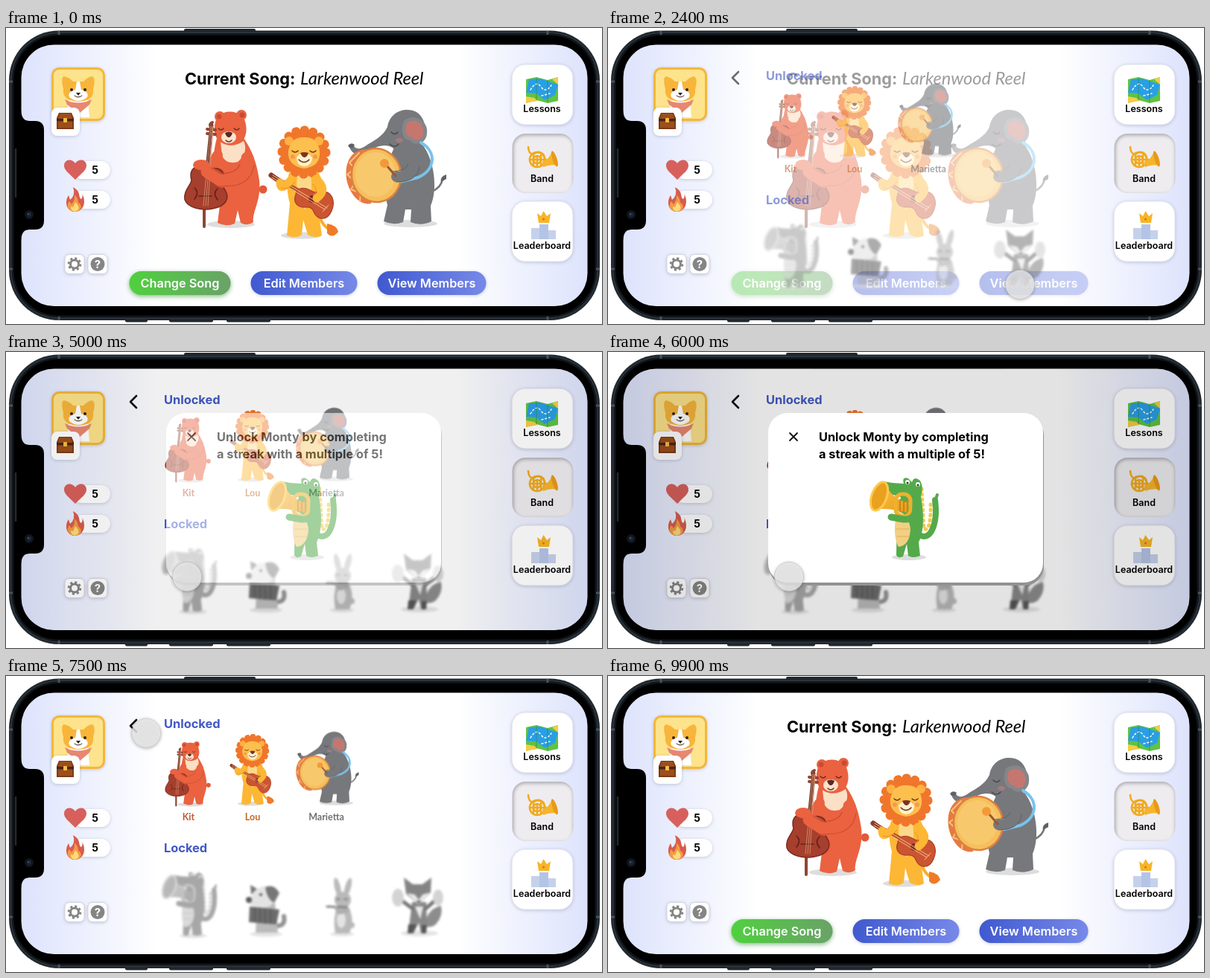
An HTML page for the animation above (10000 ms loop, 800x398 px).

```html
<!DOCTYPE html>
<html lang="en">
<head>
<meta charset="utf-8">
<title>Animal band</title>
<style>
  html, body { margin: 0; width: 100%; height: 100%; overflow: hidden; background: #fff; }
  svg { display: block; width: 800px; height: 398px; }
  text { font-family: Inter, sans-serif; font-weight: 700; }
  .mid { text-anchor: middle; }
  .tab { font-size: 12.5px; font-weight: 600; text-anchor: middle; }
  .pill { font-size: 16.3px; font-weight: 600; fill: #fff; text-anchor: middle; }
  .head { font-size: 16.4px; fill: #4059c6; }
  .name { font: 700 12.5px Lato, sans-serif; text-anchor: middle; }
  .line { fill: none; stroke-linecap: round; stroke-linejoin: round; }
  .soft { filter: drop-shadow(0 1px 2px #7f86a866); }
  .glow { filter: drop-shadow(0 2px 3px #4c9a48aa); }
  .inset { fill: none; filter: blur(2px); }
  .locked { filter: grayscale(1) blur(1.4px); opacity: .8; }
  #list, #popup { opacity: 0; }
  #finger { transform: translate(552px, 420px); }
  #touch { filter: drop-shadow(0 1px 2px #0005); }
</style>
</head>
<body>
<svg viewBox="0 0 800 398">
<defs>
  <linearGradient id="sky"><stop stop-color="#dde3fc"/><stop offset=".24" stop-color="#fff"/><stop offset=".77" stop-color="#fff"/><stop offset="1" stop-color="#dde3fc"/></linearGradient>
  <linearGradient id="green"><stop stop-color="#50d03f"/><stop offset="1" stop-color="#6aa268"/></linearGradient>
  <linearGradient id="blue"><stop stop-color="#4059cf"/><stop offset="1" stop-color="#7789e8"/></linearGradient>
  <linearGradient id="gold" x2="1" y2="1"><stop stop-color="#ffc64a"/><stop offset="1" stop-color="#e79a18"/></linearGradient>
  <clipPath id="glass"><rect x="20.5" y="22.5" width="760" height="351.5" rx="44"/></clipPath>
  <clipPath id="pressed"><rect x="679.5" y="142" width="82" height="80" rx="18"/></clipPath>

  <g id="bear">
    <ellipse cx="302" cy="264" rx="32" ry="5" fill="#ddd"/>
    <circle cx="345" cy="217" r="5.5" fill="#e05a38"/>
    <path fill="#ea623f" d="M283 148C276 172 276 215 287 238L284 262Q295 268 307 263L311 245 315 262Q325 267 332 261C330 247 343 232 340 205C337 183 331 165 319 148Z"/>
    <path fill="#fbe0c6" d="M288 153Q302 163 319 152Q326 167 311 180Q296 184 290 172Z"/>
    <g fill="#ea623f"><circle cx="287" cy="119" r="7"/><circle cx="316" cy="117" r="7"/><path d="M284 118Q300 107 318 118C325 132 325 151 310 156Q296 160 286 152C277 144 279 128 284 118Z"/></g>
    <g fill="#c94b34"><circle cx="286" cy="119" r="3.5"/><circle cx="317" cy="117" r="3.5"/></g>
    <ellipse cx="299" cy="147" rx="10" ry="8" fill="#fce3cd"/>
    <path fill="#5b2a22" d="M294 141Q299 138 304 141Q302 147 299 147Q296 147 294 141Z"/>
    <path class="line" stroke="#6e2d22" stroke-width="1.5" d="M285 135q4 4 7 0M306 135q4 4 7 0M295 151q4 4 8 0"/>
    <path class="line" stroke="#ea623f" stroke-width="14" d="M284 171Q277 186 262 187"/>
    <path class="line" stroke="#74382c" stroke-width="5" d="M276 131 270 190"/>
    <path class="line" stroke="#8f4631" stroke-width="4" d="M277 127q-6 3 0 8M270 136l11 1M270 142l11 1M266 245V267"/>
    <path fill="#a63f2d" stroke="#7c2c22" stroke-width="1.5" d="M262 186C250 185 246 194 249 205C247 213 238 219 240 231C244 242 264 246 277 243C295 240 301 229 294 218C289 211 288 205 292 197C291 188 278 187 272 190Z"/>
    <path class="line" stroke="#662118" stroke-width="1.6" d="M253 215q7 6 0 15M284 216q-7 6 0 15M259 226H276"/>
    <path class="line" stroke="#d99a76" stroke-width=".8" d="M275 132 265 239M277 132 268 239M278 132 271 239"/>
    <path class="line" stroke="#ea623f" stroke-width="17" d="M324 175Q328 194 310 203L290 206 270 193"/>
    <path class="line" stroke="#c94a31" stroke-width="1.1" d="M314 183Q310 195 288 196L275 188M333 184Q329 209 304 212L284 213M254 184l8 5M255 188l7 4"/>
    <ellipse cx="262" cy="184" rx="11" ry="7" fill="#ea623f"/>
  </g>

  <g id="lion">
    <ellipse cx="396" cy="279" rx="27" ry="4.5" fill="#ddd"/>
    <path class="line" stroke="#f7ae2d" stroke-width="4" d="M418 247Q427 273 439 270"/>
    <path fill="#ef7b26" d="M431 263Q444 265 446 274Q438 284 431 276Z"/>
    <path fill="#fdb735" d="M383 187Q373 208 381 236L377 279Q389 284 397 278L399 258 405 278Q415 284 424 279L420 250C430 231 428 203 415 188Z"/>
    <path fill="#fdd88a" d="M391 198Q400 204 409 198Q413 225 401 244Q387 229 391 198Z"/>
    <circle cx="400" cy="167" r="31" fill="#f0762b"/>
    <circle cx="400" cy="167" r="30" fill="none" stroke="#f0762b" stroke-width="11" stroke-linecap="round" stroke-dasharray="1 10.78"/>
    <g transform="translate(0 5)">
      <circle cx="380" cy="147" r="6" fill="#fcb343"/><circle cx="420" cy="147" r="6" fill="#fcb343"/>
      <path fill="#fdbf4d" d="M379 160Q383 141 400 142Q418 141 421 160Q423 181 400 184Q377 180 379 160Z"/>
      <path fill="#fff0cf" d="M390 169Q400 156 411 169Q411 180 400 181Q390 180 390 169Z"/>
      <path fill="#79351f" d="M395 163Q400 161 406 163Q404 169 400 169Q397 168 395 163Z"/>
      <path class="line" stroke="#713718" stroke-width="1.5" d="M384 160q4 4 8 0M408 160q4 4 8 0M393 172q7 7 14 0"/>
      <g fill="#f28a50" opacity=".7"><circle cx="385" cy="168" r="3"/><circle cx="415" cy="168" r="3"/></g>
    </g>
    <path class="line" stroke="#b75326" stroke-width="5" d="M359 200 414 230"/>
    <path class="line" stroke="#8d3924" stroke-width="7" d="M356 198l7 5"/>
    <path fill="#cb5431" stroke="#a63f28" stroke-width="1.2" d="M389 224C389 215 400 213 408 218Q415 223 423 220C437 218 443 232 437 246C431 260 418 259 413 247Q411 240 402 241C390 242 385 233 389 224Z"/>
    <circle cx="411" cy="230" r="5" fill="#76281f"/>
    <path class="line" stroke="#f5c08b" stroke-width="1" d="M358 198 431 242M357 201 428 244M425 247l8-9"/>
    <path class="line" stroke="#fdb735" stroke-width="11" d="M383 204Q368 221 368 208M416 203Q433 217 417 229"/>
    <path class="line" stroke="#e89025" d="M388 207Q378 219 369 215M412 210Q421 219 412 225"/>
  </g>

  <g id="elephant">
    <ellipse cx="543" cy="263" rx="36" ry="5" fill="#ddd"/>
    <path class="line" stroke="#747579" stroke-width="2.5" d="M571 220Q584 215 586 203"/>
    <path fill="#606166" d="M584 207Q582 200 591 197L591 203Z"/>
    <path fill="#77787c" d="M523 158C508 181 508 222 512 238L507 260Q520 266 533 261L536 244 544 244 543 261Q557 267 571 260L570 239C580 217 575 177 559 157Z"/>
    <path fill="#77787c" d="M512 133C515 114 532 107 546 111C565 116 568 147 555 159C541 171 527 172 519 161C509 154 494 160 486 167C477 173 464 171 461 160L466 157C469 164 476 163 482 159C494 151 506 146 512 133Z"/>
    <path fill="#606166" d="M459 158q4-5 9-1l-2 4h-5z"/>
    <path fill="#85868a" d="M535 124C548 114 568 125 565 142C564 156 548 160 542 151C531 151 529 132 535 124Z"/>
    <path fill="#c5776f" d="M539 127C550 120 563 130 560 143C558 152 548 153 545 147C536 147 534 134 539 127Z"/>
    <path class="line" stroke="#47484d" stroke-width="1.5" d="M517 140q5 5 9 0M515 156q7 6 12 0"/>
    <ellipse cx="528" cy="151" rx="5" ry="3" fill="#b47d7c" opacity=".7"/>
    <path class="line" stroke="#78c3ec" stroke-width="4" d="M557 154C579 167 576 191 553 201L524 208"/>
    <path fill="#e77a40" d="M485 163C463 163 454 181 457 203C461 224 475 239 490 236L506 166Z"/>
    <path class="line" stroke="#f7c17a" stroke-width="2" d="M474 168 461 181 468 189 458 197 469 207 463 217 476 222 475 233"/>
    <ellipse cx="497" cy="198" rx="33" ry="36" transform="rotate(-8 497 198)" fill="#f5bf5b" stroke="#dd8143" stroke-width="2.5"/>
    <ellipse cx="496" cy="197" rx="27" ry="30" fill="#f9cc76" opacity=".7"/>
    <path class="line" stroke="#77787c" stroke-width="14" d="M547 183Q547 201 524 200"/>
    <path class="line" stroke="#606166" d="M540 183Q537 192 519 193M555 186Q553 207 524 207"/>
    <path class="line" stroke="#9a5835" stroke-width="3" d="M523 199 511 185"/><circle cx="508" cy="182" r="6" fill="#f39937"/>
  </g>

  <g id="croc">
    <ellipse cx="404" cy="276" rx="23" ry="4" fill="#ddd"/>
    <path class="line" stroke="#f2cb52" stroke-width="5" stroke-dasharray="1 6" d="M421 184 424 238Q434 242 433 202"/>
    <path class="line" stroke="#54aa4b" stroke-width="8" d="M414 243C433 260 443 230 439 199"/>
    <path class="line" stroke="#54aa4b" stroke-width="4" d="M439 200 442 192"/>
    <path fill="#54aa4b" d="M397 177Q394 167 403 170L408 175Q411 166 419 173Q424 181 420 194C423 214 426 237 417 256L419 274Q409 278 403 274L401 258 396 275Q389 278 387 273L388 220 393 195 379 191Q367 187 370 174Q383 177 397 177Z"/>
    <path fill="#f3cf83" d="M388 213Q403 217 406 238Q405 260 390 262Q381 247 388 213Z"/>
    <path class="line" stroke="#d9a950" stroke-width=".8" d="M388 228h15M387 238h18M388 248h16"/>
    <circle cx="402" cy="175" r="3" fill="#fff"/><circle cx="416" cy="178" r="3" fill="#fff"/>
    <circle cx="402" cy="176" r="1.5" fill="#253b24"/><circle cx="416" cy="179" r="1.5" fill="#253b24"/>
    <path fill="url(#gold)" d="M371 176Q382 199 404 203L401 216Q377 209 356 212Z"/>
    <ellipse cx="364" cy="194" rx="10" ry="20" transform="rotate(20 364 194)" fill="#e9a11f" stroke="#ffc94e" stroke-width="3"/>
    <rect x="386" y="191" width="20" height="30" rx="9" class="line" stroke="#efb02e" stroke-width="5"/>
    <path class="line" stroke="#c98518" stroke-width="2" d="M392 199v15M397 200v14M402 200v14"/>
    <path class="line" stroke="#54aa4b" stroke-width="9" d="M413 207Q414 226 397 225L380 222"/>
  </g>

  <g id="dog">
    <ellipse cx="349" cy="347" rx="22" ry="3.5" fill="#ddd"/>
    <path class="line" stroke="#777" stroke-width="6" d="M361 336Q376 337 373 323"/>
    <path fill="#aaa" d="M337 305h24l4 40H335Z"/>
    <path fill="#ddd" d="M333 290Q345 277 358 287Q365 303 353 310Q338 315 324 305Z"/>
    <path fill="#555" d="M348 284Q360 279 367 292L360 305Q350 300 348 284ZM337 286l-9-5 1 13Z"/>
    <circle cx="326" cy="301" r="4" fill="#333"/><circle cx="342" cy="294" r="2" fill="#333"/>
    <path fill="#484848" d="M327 310 367 314 363 334 326 331Z"/>
    <path stroke="#333" stroke-width="2" d="M334 311v20M341 312v20M348 313v20M355 313v20"/>
  </g>

  <g id="rabbit">
    <ellipse cx="451" cy="347" rx="16" ry="3" fill="#ddd"/>
    <g fill="#a8a8a8"><ellipse cx="445" cy="284" rx="4" ry="13" transform="rotate(-13 445 284)"/><ellipse cx="459" cy="284" rx="4" ry="13" transform="rotate(15 459 284)"/>
    <circle cx="452" cy="301" r="11"/><path d="M445 309h14Q469 327 461 346H442Q438 326 445 309Z"/><circle cx="464" cy="335" r="4"/></g>
    <ellipse cx="450" cy="328" rx="6" ry="11" fill="#ddd"/>
    <path class="line" stroke="#666" stroke-width="3" d="M431 310 457 311"/>
    <path class="line" stroke="#999" stroke-width="5" d="M459 315 448 318 443 312"/>
    <path class="line" stroke="#444" stroke-width="1.5" d="M444 300h4M454 300h4"/>
  </g>

  <g id="fox">
    <ellipse cx="555" cy="346" rx="25" ry="4" fill="#ddd"/>
    <path fill="#707070" d="M563 330Q568 312 584 309Q587 323 577 334Q569 340 562 336Z"/>
    <path fill="#6a6a6a" d="M545 304H564L565 330 563 346H557L554 332 547 346H540Z"/>
    <path fill="#666" d="M534 271 546 280H559L571 271 570 291 554 307 537 293Z"/>
    <path fill="#e4e4e4" d="M538 292 549 294 554 301 559 294 569 291 554 307ZM549 310h11l-4 17Z"/>
    <path fill="#2b2b2b" d="M551 302h6l-3 4zM540 334h11l-5 12h-7zM558 335h7l-1 11h-6z"/>
    <path class="line" stroke="#555" stroke-width="5" d="M546 313 530 301M563 313 577 301"/>
    <ellipse cx="526" cy="298" rx="8" ry="12" fill="#c9c9c9"/><ellipse cx="580" cy="298" rx="7" ry="11" fill="#c9c9c9"/>
  </g>
</defs>

<g id="phone">
  <g fill="#20262d"><rect x="239" y="1" width="96" height="8" rx="2"/><rect x="160" y="386" width="30" height="9.5" rx="2"/><rect x="219" y="386" width="59" height="9.5" rx="2"/><rect x="296" y="386" width="59" height="9.5" rx="2"/></g>
  <rect x="4" y="3.5" width="793" height="389.500" rx="67" fill="#22292f"/>
  <rect x="7" y="6.5" width="787" height="383.500" rx="64" fill="#10161b" stroke="#343d45"/>
  <rect x="10.5" y="10" width="780" height="376.500" rx="60"/>
  <path stroke="#4a535a" stroke-width="3" d="M4 72h5M4 324h5M792 72h5M792 324h5M71 4v5M71 388v5M727 4v5M727 388v5"/>
  <path class="line" stroke="#252a2e" stroke-width="2.5" d="M13 163V227"/>
</g>

<g clip-path="url(#glass)">
  <rect x="20" y="22" width="761" height="353" fill="url(#sky)"/>

  <g id="home">
    <text x="240" y="76" font-size="21.7">Current Song:</text>
    <text x="395" y="76" style="font:italic 400 23.6px Lato,sans-serif">Larkenwood Reel</text>
    <use href="#bear"/><use href="#lion"/><use href="#elephant"/>
    <rect x="165.5" y="327" width="136" height="32" rx="16" fill="url(#green)" class="glow"/>
    <g class="soft" fill="url(#blue)">
      <rect x="328.5" y="327" width="143" height="32" rx="16"/>
      <rect x="498.5" y="327" width="146" height="32" rx="16"/>
    </g>
    <text class="pill" x="233.5" y="349">Change Song</text>
    <text class="pill" x="400" y="349">Edit Members</text>
    <text class="pill" x="571.5" y="349">View Members</text>
  </g>

  <g id="list">
    <path class="line" stroke="#111" stroke-width="2.6" d="M175 59 167 67 175 75"/>
    <text class="head" x="212" y="70">Unlocked</text>
    <text class="head" x="212" y="237">Locked</text>
    <use href="#bear" transform="translate(82 27.5) scale(.55)"/>
    <use href="#lion" transform="translate(76.6 -5.5) scale(.635)"/>
    <use href="#elephant" transform="translate(103.5 6.1) scale(.626)"/>
    <text class="name" x="245" y="194" fill="#bd5a35">Kit</text>
    <text class="name" x="331" y="194" fill="#c26824">Lou</text>
    <text class="name" x="430" y="194" fill="#707074">Marietta</text>
    <g class="locked"><use href="#croc" transform="translate(-72 128.4) scale(.8)"/><use href="#dog"/><use href="#rabbit"/><use href="#fox"/></g>
  </g>

  <g id="left">
    <rect x="62.5" y="54.5" width="69" height="69" rx="9" fill="#fde38b" stroke="#f3b73c" stroke-width="3" class="soft"/>
    <path fill="#fff" d="M84 97H110L112 120H82Z"/>
    <path fill="#f8b53b" d="M77 82Q73 66 78 65Q86 67 90 72H104Q109 66 116 65Q121 69 117 82Q119 98 97 99Q75 98 77 82Z"/>
    <path fill="#fff" d="M95 72H99L101 83Q112 86 109 93Q97 103 85 93Q82 86 93 83Z"/>
    <circle cx="88" cy="83" r="2" fill="#302018"/><circle cx="106" cy="83" r="2" fill="#302018"/>
    <path fill="#302018" d="M94 87h6l-3 4z"/><path class="line" stroke="#302018" d="M92 91q5 4 10 0"/>
    <path fill="#e98770" d="M79 96Q97 105 115 96L112 103 98 115 82 103Z"/>
    <rect x="61" y="107" width="38" height="38" rx="8" fill="#fff" class="soft"/>
    <path fill="#7d3b17" d="M71 114H88L91 121V136H68V121Z"/><path fill="#9c4f1c" d="M72 115H87L89 122H70ZM70 126H89V134H70Z"/>
    <path fill="#4c2414" d="M68 122h23v3H68z"/><rect x="77" y="121" width="5" height="6" rx="1" fill="#f4bd40"/>
    <g class="soft" fill="#fff"><rect x="90" y="179" width="50" height="24" rx="12"/><rect x="90" y="219" width="50" height="24" rx="12"/></g>
    <path fill="#d7605c" d="M93 204C84 195 78 191 78 185C78 176 89 175 93 182C97 175 108 176 108 185C108 191 102 195 93 204Z"/>
    <path fill="#d75c4e" d="M90 214C102 221 96 227 101 230Q104 226 102 222C109 236 103 247 92 247C81 246 78 234 84 225L86 231Q94 225 90 214Z"/>
    <path fill="#f39a43" d="M92 224C99 231 95 235 99 236C104 243 97 247 92 247C82 246 81 237 85 233L88 237Q93 231 92 224Z"/>
    <path fill="#fbdb7a" d="M93 234Q101 242 95 246Q87 248 87 240L90 241Z"/>
    <text class="mid" x="119.5" y="196" font-size="14">5</text><text class="mid" x="119.5" y="236" font-size="14">5</text>
    <g class="soft" fill="#fff" stroke="#d4d4dc"><rect x="79" y="304.5" width="26" height="26" rx="6"/><rect x="110" y="304.5" width="26" height="26" rx="6"/></g>
    <g fill="none" stroke="#858585" stroke-width="3"><circle cx="92" cy="317.5" r="5.5"/><circle cx="92" cy="317.5" r="7.8" stroke-dasharray="3.06 3.06"/></g>
    <circle cx="123" cy="317.5" r="9.5" fill="#858585"/><text class="mid" x="123" y="323" font-size="15" fill="#fff">?</text>
  </g>

  <g id="tabs">
    <g class="soft" fill="#fff" stroke="#dfe0ec"><rect x="679" y="49" width="82" height="81" rx="18"/><rect x="679" y="233" width="82" height="81" rx="18"/></g>
    <g clip-path="url(#pressed)">
      <rect x="679" y="142" width="83" height="80" fill="#eeecef"/>
      <rect x="679" y="142" width="85" height="84" rx="18" class="inset" stroke="#aaa8ad" stroke-width="5"/>
    </g>
    <path fill="#5fc343" d="M698 69 712 66 727 70 741 66V98L727 101 712 97 698 101Z"/>
    <path fill="#2a9fe4" d="M702 69 717 68 741 76 737 90 723 97 712 88 698 87Z"/><path fill="#f4cc48" d="M698 92 709 94 714 98 698 101ZM733 69 741 66V76Z"/>
    <path class="line" stroke="#fff" stroke-width="1.5" stroke-dasharray="2 3" d="M704 83q8-13 14-4t14-2M719 91l11-3"/>
    <path stroke="#23875d" stroke-width=".7" d="M712 67v30M727 70v30"/>
    <g class="line" stroke="#f1a91d" stroke-width="2.6"><circle cx="713" cy="177" r="10"/><circle cx="713" cy="177" r="5"/><path d="M701 160Q702 174 713 167Q722 166 724 178M708 171v13M713 172v13M718 171v13M703 177H725"/></g>
    <path fill="#f5b42c" d="M720 179Q729 178 733 165L740 185Q730 183 721 187Z"/><ellipse cx="736.5" cy="176" rx="3" ry="11" transform="rotate(-18 736.5 176)" fill="#e79a19"/>
    <path fill="#c5d1ea" d="M705 269H717V284H705ZM727 272H738V284H727Z"/><path fill="#b4c4e6" d="M716 264H728V284H716Z"/>
    <path fill="#f7b525" d="M713 249 718 253 721.5 246 726 253 731 249 729 262H715Z"/><circle cx="721.5" cy="257" r="1.5" fill="#da6c3c"/>
    <text class="tab" x="719.5" y="112.5">Lessons</text><text class="tab" x="719.5" y="206.5">Band</text><text class="tab" x="719.5" y="297">Leaderboard</text>
  </g>

  <g id="popup">
    <rect x="20" y="22" width="761" height="353" opacity=".11"/>
    <rect x="216" y="86" width="369" height="228" rx="26" fill="#929292"/>
    <rect x="215" y="82" width="369" height="228" rx="26" fill="#fff"/>
    <path class="line" stroke="#111" stroke-width="1.8" d="M244 109 254 119M254 109 244 119"/>
    <text x="283" y="120" font-size="16.3">Unlock Monty by completing</text>
    <text x="283" y="143" font-size="16.3">a streak with a multiple of 5!</text>
    <use href="#croc"/>
  </g>
</g>

<path d="M20 110C21 122 25 125 32 125H39Q51 125 51 137V259Q51 271 39 271H32C25 271 21 274 20 286Z"/>
<circle cx="31" cy="251" r="6" fill="#11151d"/><circle cx="31" cy="251" r="3" fill="#1d2739"/><circle cx="30" cy="250" r="1" fill="#4b5d82"/>
<g id="finger"><circle id="touch" r="19.5" fill="#ebebeb" fill-opacity=".82" stroke="#bbb" stroke-opacity=".6"/></g>
</svg>

<script>
  const LOOP = 10000;

  // Each step is [ms, value]; values hold or ease toward the next step.
  function play(id, prop, steps, format = v => v) {
    const all = [[0, steps[0][1]], ...steps, [LOOP, steps.at(-1)[1]]];
    document.getElementById(id).animate(
      all.map(([ms, v]) => ({ offset: ms / LOOP, [prop]: format(v), easing: "ease-out" })),
      { duration: LOOP, iterations: Infinity }
    );
  }

  const place = ([x, y]) => `translate(${x}px, ${y}px)`;
  const scale = s => `scale(${s})`;
  const button = [553, 345], card = [243, 302], close = [249, 114], back = [174, 68];

  play("home", "opacity", [[2250, 1], [2600, 0], [8000, 0], [8350, 1]]);
  play("list", "opacity", [[2250, 0], [2600, 1], [8000, 1], [8350, 0]]);
  play("popup", "opacity", [[4850, 0], [5250, 1], [6850, 1], [7200, 0]]);
  play("finger", "transform", [
    [1300, [552, 420]], [1800, button], [3200, button], [4300, card],
    [6050, card], [6650, close], [7250, close], [7650, back],
    [8450, back], [9000, [150, -32]]
  ], place);
  play("touch", "transform", [2050, 4500, 6700, 7800].flatMap(
    ms => [[ms, 1], [ms + 100, .86], [ms + 220, 1]]
  ), scale);
</script>
</body>
</html>
```
